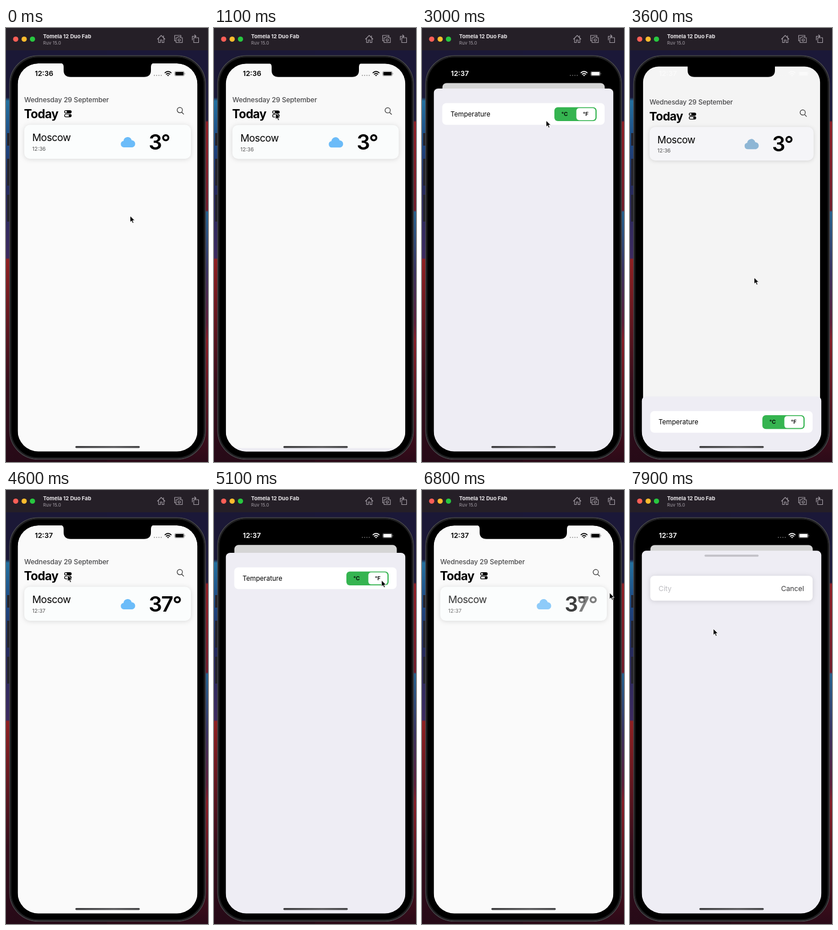
Recreate the animation shown at these times as an HTML page. Size 354 px wide and 760 px high, loop 8 s.

```html
<!DOCTYPE html>
<html lang="en">
<head>
<meta charset="utf-8">
<title>Weather settings</title>
<style>
html, body { margin: 0; width: 100%; height: 100%; overflow: hidden; background: #000; }
svg { display: block; width: 100%; height: 100%; font-family: Inter, "Open Sans", sans-serif; }
.line { fill: none; stroke-linecap: round; stroke-linejoin: round; }
.card { filter: drop-shadow(0 1px 4px #0002); }
</style>
</head>
<body>
<svg viewBox="0 0 354 760">
  <defs>
    <linearGradient id="wallLeft" x2="0" y2="1">
      <stop offset=".16" stop-color="#1b1836"/><stop offset=".168" stop-color="#23709f"/>
      <stop offset=".27" stop-color="#1d4580"/><stop offset=".37" stop-color="#252a5c"/>
      <stop offset=".53" stop-color="#3d2a60"/><stop offset=".533" stop-color="#8f2022"/>
      <stop offset=".66" stop-color="#681820"/><stop offset=".82" stop-color="#360d1b"/>
      <stop offset="1" stop-color="#260a17"/>
    </linearGradient>
    <linearGradient id="wallRight" x2="0" y2="1">
      <stop offset=".213" stop-color="#1b1838"/><stop offset=".217" stop-color="#8f1c24"/>
      <stop offset=".42" stop-color="#701a2a"/><stop offset=".424" stop-color="#23608f"/>
      <stop offset=".56" stop-color="#38305f"/><stop offset=".68" stop-color="#5c1c38"/>
      <stop offset=".72" stop-color="#861b25"/><stop offset="1" stop-color="#2b0a18"/>
    </linearGradient>
    <linearGradient id="bar"><stop stop-color="#3c3c3e"/><stop offset=".6" stop-color="#5c5c5e"/><stop offset="1" stop-color="#444446"/></linearGradient>
    <clipPath id="screen"><rect x="20.500" y="62" width="315" height="679.500" rx="36"/></clipPath>
  </defs>

  <!-- desktop and simulator window -->
  <rect width="177" height="760" fill="url(#wallLeft)"/>
  <rect x="177" width="177" height="760" fill="url(#wallRight)"/>
  <rect width="354" height="39" fill="#251f27"/>
  <circle cx="17" cy="19.500" r="4.600" fill="#fe5f57"/>
  <circle cx="31.800" cy="19.500" r="4.600" fill="#febc2e"/>
  <circle cx="46.400" cy="19.500" r="4.600" fill="#28c840"/>
  <text x="65" y="18.300" font-size="9.300" font-weight="700" fill="#eae7ea">Tomela 12 Duo Fab</text>
  <text x="65" y="28.600" font-size="8" fill="#a39da5">Ruv 15.0</text>
  <g class="line" stroke="#a29ca4" stroke-width="1.100">
    <path d="M265.500 19.500l6.500-6.500 6.500 6.500M267.300 18.500v7h3.200v-4.500h3v4.500h3.200v-7M276 16v-2.500"/>
    <path d="M297.500 22.500h-2v-9.500h11v2.500"/>
    <path d="M298 17h2.500l1-1.500h3.500l1 1.500h3v8.500h-11z"/><circle cx="303.500" cy="21" r="2"/>
    <path d="M329 17h8.500v8.500h-8.500zM326.500 21v-6.500h6M330.500 12l2.500 2.500-2.500 2.500"/>
  </g>

  <!-- phone body -->
  <path d="M4.500 184v22M4.500 229v47M4.500 292v47" stroke="#24232b" stroke-width="5"/>
  <rect x="6.500" y="48.500" width="343" height="706.500" rx="50" fill="#000" stroke="#47474a" stroke-width="1.500"/>
  <rect x="8.500" y="50.500" width="339" height="702.500" rx="48" fill="none" stroke="#202022" stroke-width="2"/>

  <g clip-path="url(#screen)">
    <g id="home">
      <rect class="page" x="20.500" y="62" width="315" height="690" fill="#fafafa"/>
      <text x="32" y="129.800" font-size="11.900" font-weight="500" letter-spacing="-.1" fill="#4a4a4c">Wednesday 29 September</text>
      <text x="31.500" y="158" font-size="21" font-weight="700" letter-spacing="-.6">Today</text>
      <rect x="102" y="144" width="13" height="5.600" rx="2.800"/>
      <circle cx="105" cy="146.800" r="1.700" fill="#fafafa"/>
      <rect x="102.600" y="151" width="11.800" height="4.600" rx="2.300" fill="none" stroke="#000" stroke-width="1.200"/>
      <circle cx="111.800" cy="153.300" r="2"/>
      <path class="line" d="M308 147.500l3.300 3.300M309.200 143.700a4.600 4.600 0 1 1-9.200 0a4.600 4.600 0 1 1 9.200 0" stroke="#333" stroke-width="1.200"/>
      <rect id="panel" class="card" x="32" y="169.500" width="292" height="59.500" rx="10"/>
      <g id="cold"></g>
      <g id="hot"></g>
      <rect id="dim" class="page" x="20.500" y="62" width="315" height="690"/>
    </g>

    <path d="M95 61q6 1 6 7v6q0 11.700 12 11.700h129q12 0 12-11.700v-6q0-6 6-7z"/>

    <g id="status">
      <text id="clock" x="50.500" y="84.400" font-size="12.300" font-weight="600"></text>
      <path class="line" d="M260 83h.01M264 83h.01M268 83h.01M272 83h.01" stroke="currentColor" stroke-width="2.200" opacity=".35"/>
      <path class="line" d="M278.700 78.400q5.300-4.400 10.600 0M281 80.900q3-2.400 6 0" stroke="currentColor" stroke-width="1.700"/>
      <path d="M284 84.600l-1.700-1.900q1.700-1.300 3.400 0z"/>
      <rect x="295.500" y="76" width="17" height="8" rx="2.300" fill="none" stroke="currentColor" stroke-width=".7" opacity=".5"/>
      <rect x="296.700" y="77.100" width="14.600" height="5.800" rx="1.300"/>
      <path d="M313.500 78.600q1.500 1.400 0 2.800z" opacity=".6"/>
    </g>

    <!-- sheet, drawn with its top edge at zero -->
    <g id="sheet">
      <rect x="20.500" width="315" height="700" rx="8" fill="#eeedf4"/>
      <g id="units">
        <rect x="35.500" y="25.500" width="284.500" height="38" rx="7" fill="#fff"/>
        <text x="50" y="49.300" font-size="11.600">Temperature</text>
        <rect x="232" y="32.700" width="74" height="24.300" rx="6" fill="#35b450"/>
        <rect id="knob" y="34.300" width="33.500" height="21.100" rx="4.800" fill="#fff"/>
        <g font-size="9.600" font-weight="600" text-anchor="middle">
          <text x="250" y="48.300">°C</text><text x="287" y="48.300">°F</text>
        </g>
      </g>
      <g id="search">
        <rect x="130.500" y="7" width="95" height="3.500" rx="1.750" fill="#c2c1c7"/>
        <rect class="card" x="35.500" y="44" width="284.500" height="43.500" rx="7" fill="#fff"/>
        <text x="50" y="70.200" font-size="12.200" fill="#bcbcc0">City</text>
        <text x="305" y="70.200" font-size="12.300" text-anchor="end" fill="#3a3a3c">Cancel</text>
      </g>
    </g>
    <rect x="121.500" y="732" width="113" height="3.400" rx="1.700" fill="url(#bar)"/>
  </g>

  <path id="cursor" d="M0 0v11.200l2.600-2.400 1.800 4.100 2-.9-1.800-3.900h3.600z" stroke="#fff" stroke-width=".9" stroke-linejoin="round"/>
</svg>

<script>
const LOOP = 8000, TOP = 106, BOTTOM = 746, GRIP = 56;
const $ = id => document.getElementById(id);
const clamp = v => Math.min(1, Math.max(0, v));
const mix = (a, b, k) => a + (b - a) * k;
const smooth = k => k * k * (3 - 2 * k);
const ramp = (t, a, b) => smooth(clamp((t - a) / (b - a)));
const spring = ms => (1 + ms * .0175) * Math.exp(-ms * .0175);
const blend = (from, to, k) => `rgb(${from.map((v, i) => Math.round(mix(v, to[i], k)))})`;

// time, x, y of the pointer tip
const path = [
  [400, 217.5, 329], [950, 108, 149], [1250, 108, 149], [1550, 102.5, 106], [1620, 102.5, 106],
  [2000, 275, 150], [2250, 275, 150], [2400, 285, 152], [2650, 285, 152],
  [3000, 217.5, 162], [3455, 217.5, 437], [3650, 217.5, 437], [4300, 108, 149], [4720, 108, 149],
  [5050, 293.5, 158], [5450, 293.5, 158], [5600, 250, 152], [5700, 250, 152],
  [5950, 227.5, 162], [6400, 227.5, 394], [6800, 328.7, 180], [7100, 305, 144], [7350, 305, 144], [7880, 146, 243]
];
const sheets = [
  { open: 1090, drag: 3000, drop: 3455 },
  { open: 4690, drag: 5950, drop: 6400 },
  { open: 7330, drag: LOOP, drop: LOOP }
];

function pointer(t) {
  const i = path.findIndex(p => p[0] > t);
  if (i <= 0) return path[i ? path.length - 1 : 0].slice(1);
  const a = path[i - 1], b = path[i], k = ramp(t, a[0], b[0]);
  return [mix(a[1], b[1], k), mix(a[2], b[2], k)];
}

function sheetTop(t) {
  const s = sheets.filter(s => s.open <= t).pop();
  if (!s) return BOTTOM;
  if (t < s.drag) return mix(TOP, BOTTOM, spring(t - s.open));
  const held = pointer(Math.min(t, s.drop))[1] - GRIP;
  return t < s.drop ? held : mix(BOTTOM, held, spring(t - s.drop));
}

const report = degrees => `
  <text x="46" y="198.300" font-size="17.500" letter-spacing="-.45">Moscow</text>
  <text class="time" x="46" y="215.300" font-size="9.300" fill="#555"></text>
  <path class="cloud" d="M206.500 209a5.700 5.700 0 0 1-.6-11.300a7.250 7.250 0 0 1 14.300-1.200a6.300 6.300 0 0 1 1 12.500z"/>
  <text x="250" y="212.800" font-size="37" font-weight="600" letter-spacing="-1.600">${degrees}°</text>`;
$("cold").innerHTML = report(3);
$("hot").innerHTML = report(37);
const all = selector => document.querySelectorAll(selector);
const times = all(".time"), clouds = all(".cloud"), pages = all(".page");

function draw(t) {
  const y = sheetTop(t), p = clamp((y - TOP) / (BOTTOM - TOP));
  const s = mix(.903, 1, p);
  $("home").setAttribute("transform", `translate(${178 * (1 - s)} ${mix(96.5, 62, p) - 62 * s}) scale(${s})`);
  pages.forEach(r => r.setAttribute("rx", mix(8, 36, p * p)));
  $("dim").setAttribute("opacity", .15 * (1 - p));

  const ink = blend([255, 255, 255], [0, 0, 0], clamp((p - .84) / .14));
  $("status").setAttribute("fill", ink);
  $("status").setAttribute("color", ink);
  $("clock").textContent = t < 2700 ? "12:36" : "12:37";

  const awake = clamp((p - .7) / .28);
  const tint = blend([184, 184, 186], [107, 188, 249], awake);
  clouds.forEach(c => c.setAttribute("fill", tint));
  $("panel").setAttribute("fill", blend([251, 249, 255], [251, 253, 253], awake));
  times.forEach((e, i) => e.textContent = i || t > 4200 ? "12:37" : "12:36");
  const hot = ramp(t, 3900, 4200) - ramp(t, 6650, 6950);
  $("cold").setAttribute("opacity", 1 - hot);
  $("hot").setAttribute("opacity", hot);

  const searching = t >= sheets[2].open;
  $("sheet").setAttribute("transform", `translate(0 ${y})`);
  $("units").style.display = searching ? "none" : "";
  $("search").style.display = searching ? "" : "none";
  $("knob").setAttribute("x", mix(233.7, 270.5, ramp(t, 2600, 2800) - ramp(t, 5650, 5850)));
  $("cursor").setAttribute("transform", `translate(${pointer(t)})`);
}

const start = performance.now();
function tick() {
  draw((performance.now() - start) % LOOP);
  requestAnimationFrame(tick);
}
tick();
</script>
</body>
</html>
```
